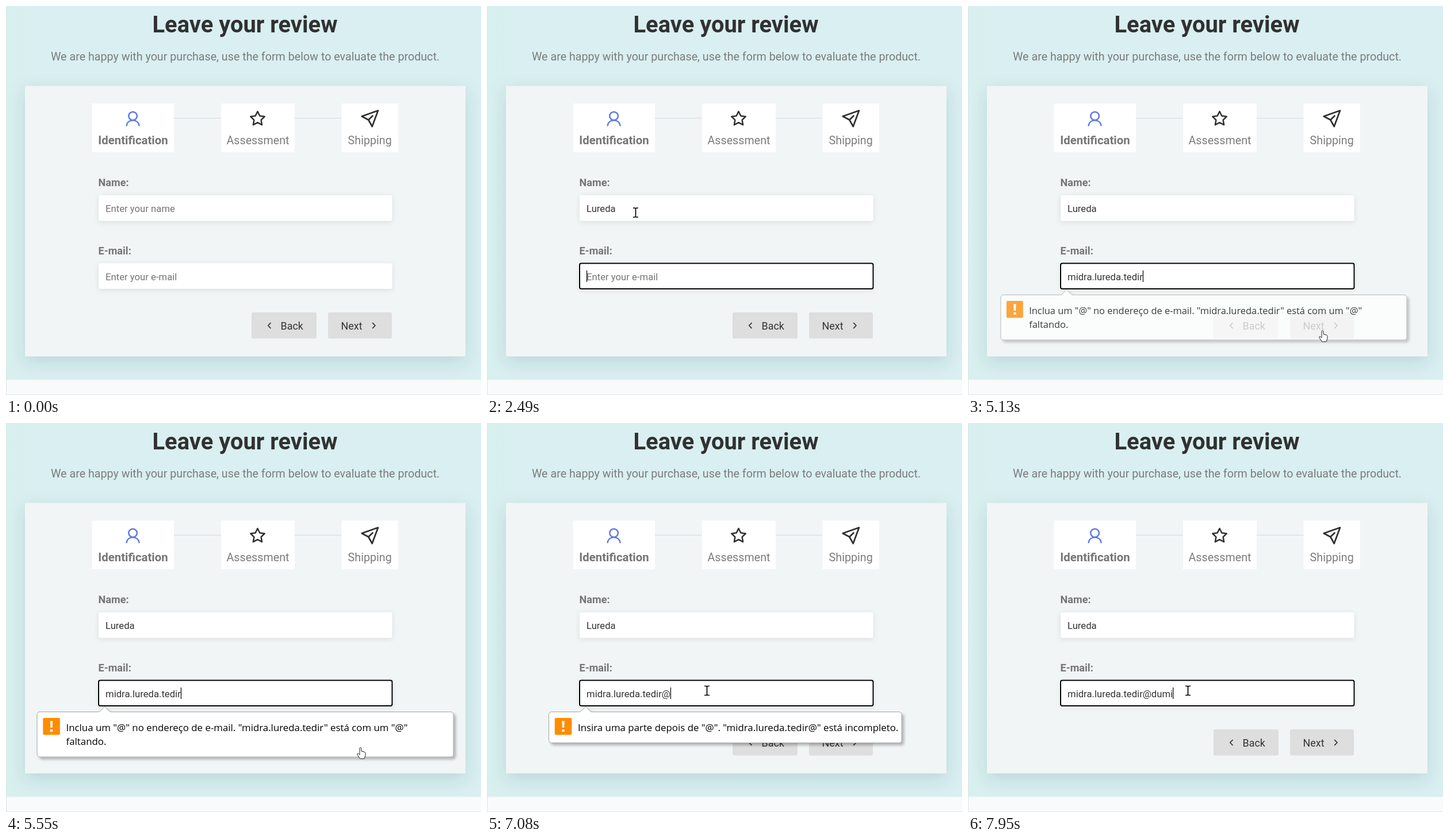
These frames come from a looping animation (826 px wide and 678 px high, 8 s). An HTML page:

```html
<!DOCTYPE html>
<html lang="en">
<head>
<meta charset="utf-8">
<title>Leave your review</title>
<style>
  html, body { margin: 0; width: 100%; height: 100%; overflow: hidden; }
  svg { display: block; width: 826px; height: 678px; }
  text { font-family: Roboto, "Noto Sans", sans-serif; fill: #757575; white-space: pre; }
  .title { font-size: 39.9px; font-weight: 700; fill: #313131; }
  .sub { font-size: 19.7px; fill: #7c7c7c; }
  .step { font-size: 19.7px; fill: #7c7c7c; }
  .active { font-size: 20.4px; font-weight: 700; }
  .label { font-size: 18.1px; font-weight: 700; }
  .field { font-size: 16.7px; }
  .typed { fill: #333; }
  .button { font-size: 17.9px; fill: #333; }
  .tip text { font: 16.85px "Open Sans", "Noto Sans", sans-serif; fill: #000; }
  .icon { fill: none; stroke: #2f2f2f; stroke-width: 2.5; stroke-linecap: round; stroke-linejoin: round; }
  .icon .user { stroke: #6079e4; }
  .icon .plane { stroke-width: 2.7; }
  .chevrons { stroke-width: 1.7; }
  .ring { fill: none; stroke: #000; stroke-width: 2; }
  .ring .rim { stroke: #fff; stroke-width: 4; }
  .mid { text-anchor: middle; }
</style>
</head>
<body>
<svg viewBox="0 0 826 678">
  <defs>
    <linearGradient id="sky">
      <stop offset="0" stop-color="#d8f0ee"/>
      <stop offset=".06" stop-color="#d9eff1"/>
    </linearGradient>
    <filter id="cardShadow" x="-10%" y="-15%" width="120%" height="130%">
      <feDropShadow dx="0" dy="10" stdDeviation="15" flood-color="#17444c" flood-opacity=".14"/>
    </filter>
    <filter id="fieldShadow" x="-5%" y="-40%" width="110%" height="200%">
      <feDropShadow dx="0" dy="2" stdDeviation="4" flood-opacity=".1"/>
    </filter>
    <filter id="tipShadow" x="-5%" y="-20%" width="110%" height="150%">
      <feDropShadow dx="4" dy="4" stdDeviation="2" flood-opacity=".25"/>
    </filter>
  </defs>

  <rect width="826" height="678" fill="url(#sky)"/>
  <rect x="33" y="139.5" width="766" height="471" fill="#f1f5f6" filter="url(#cardShadow)"/>
  <rect y="651.5" width="826" height="26.5" fill="#f9fafc"/>
  <path d="M.5 0V677.5H826" fill="none" stroke="#dde4e7"/>

  <text class="title mid" x="415.5" y="46">Leave your review</text>
  <text class="sub mid" x="416" y="94.5">We are happy with your purchase, use the form below to evaluate the product.</text>

  <path d="M150 195.5H682" stroke="#d3dcdd"/>
  <path d="M149.5 170H292V255H149.5zM374 170H502V255H374zM583.5 170H682V255H583.5z" fill="#fff"/>
  <g class="icon">
    <path class="user" d="M209.7 208.3C210.5 202.5 215 199.3 220.6 199.3S230.7 202.5 231.5 208.3M227.9 191.8a7.3 7.3 0 1 1-14.6 0a7.3 7.3 0 1 1 14.6 0z"/>
    <path id="star"/>
    <path class="plane" d="M647 182.3L618.7 192.3L630.3 198.5L636.7 210zM630.3 198.5L637.5 191.5"/>
  </g>
  <text class="active mid" x="221" y="241">Identification</text>
  <text class="step mid" x="438" y="241">Assessment</text>
  <text class="step mid" x="632.7" y="241">Shipping</text>

  <text class="label" x="160.5" y="314">Name:</text>
  <text class="label" x="160.5" y="433">E-mail:</text>
  <g fill="#fff" filter="url(#fieldShadow)">
    <rect x="161" y="330" width="510.5" height="44.5" rx="3"/>
    <rect x="161" y="448.5" width="510.5" height="44.5" rx="3"/>
  </g>
  <g id="ring" class="ring">
    <rect class="rim" x="161" width="510.5" height="44.5" rx="3"/>
    <rect x="161" width="510.5" height="44.5" rx="3"/>
  </g>
  <text id="name" class="field" x="173" y="359"/>
  <text id="email" class="field" x="173" y="477.7"/>
  <rect id="caret" width="1.2" height="20" fill="#000"/>

  <rect id="back" x="427" y="534" width="113" height="45.5" rx="3"/>
  <rect id="next" x="560" y="534" width="111" height="45.5" rx="3"/>
  <text class="button" x="477.5" y="564">Back</text>
  <text class="button" x="582.5" y="564">Next</text>
  <path class="icon chevrons" d="M460 552.7L455.7 557L460 561.3M637.7 552.7L642 557L637.7 561.3"/>

  <g id="tips"></g>
  <g id="cursors" stroke-linejoin="round">
    <path id="beam" fill="none" stroke="#000" stroke-width="1.7" d="M-4.5-8H-1.5L0-7L1.5-8H4.5M0-7V7M-4.5 8H-1.5L0 7L1.5 8H4.5"/>
    <path id="arrow" fill="#fff" stroke="#333" d="M0 .5V17L4 13.5L6.5 19L9 18L6.6 12.5H12z"/>
    <path id="hand" fill="#fff" stroke="#222" d="M-1.5 1Q0-1 1.5 1V6.5L6.5 7.7Q8.5 8.3 8.5 10.2V14L6.5 19.5H-1L-5.7 12.5Q-6 10-4 10.5L-1.5 12.7z"/>
  </g>
</svg>
<script>
const LOOP = 8000;
const $ = id => document.getElementById(id);
const clamp = v => Math.max(0, Math.min(1, v));
const show = (el, on) => el.setAttribute('visibility', on ? 'visible' : 'hidden');

const NAME = 'Lureda';
const LOCAL = 'midra.lureda.tedir';
const DOMAIN = '@dumi';
const nameKeys = [1630, 1830, 2030, 2170, 2220, 2360];
const pasteAt = 3420;
const domainKeys = [6580, 7410, 7550, 7720, 7950];
const focusName = 820, focusEmail = 2490;
const caretResets = [focusName, ...nameKeys, focusEmail, pasteAt, ...domainKeys];

// time, x, y
const pointer = [
  [130, 562, 589], [680, 258.5, 360], [3950, 258.5, 360], [4500, 549, 570],
  [4710, 616.5, 565.5], [5620, 616.5, 565.5], [6180, 382.5, 466.5]
];

const starPoints = Array.from({ length: 10 }, (_, i) => {
  const a = i * Math.PI / 5 - Math.PI / 2, r = i % 2 ? 6.5 : 12.9;
  return [437.5 + r * Math.cos(a), 196.7 + r * Math.sin(a)].map(v => v.toFixed(2));
});
$('star').setAttribute('d', 'M' + starPoints.join('L') + 'z');

function makeTip(left, right, bottom, lines, from, until, fade) {
  const g = document.createElementNS('http://www.w3.org/2000/svg', 'g');
  const ix = left + 10.3;
  g.setAttribute('class', 'tip');
  g.innerHTML = `
    <path filter="url(#tipShadow)" fill="#fff" stroke="#a3a3a3" d="M${left + 5} 503.5H162L171.5 494.5L181 503.5H${right - 5}
      q5 0 5 5V${bottom - 5}q0 5-5 5H${left + 5}q-5 0-5-5V508.5q0-5 5-5z"/>
    <rect x="${ix}" y="514" width="29.5" height="29.5" rx="2" fill="#ff8c00"/>
    <path fill="#fff" d="M${ix + 12.5} 519.5h4.5l-.6 11.5h-3.3zM${ix + 12.5} 534h4.5v4h-4.5z"/>
    ${lines.map((s, i) => `<text x="${left + 50.5}" y="${537 + 24 * i}">${s}</text>`).join('')}`;
  $('tips').append(g);
  return { g, from, until, fade };
}

const tips = [
  makeTip(54, 778, 582, [`Inclua um "@" no endereço de e-mail. "${LOCAL}" está com um "@"`, 'faltando.'], 4780, 6580, 0),
  makeTip(107.5, 721, 557.5, [`Insira uma parte depois de "@". "${LOCAL}@" está incompleto.`], 6590, 7410, 230)
];

const typedCount = (keys, t) => keys.filter(k => t >= k).length;

function setField(el, value, placeholder) {
  el.textContent = value || placeholder;
  el.classList.toggle('typed', !!value);
  return value ? el.getComputedTextLength() : 0;
}

function drawFields(t) {
  const name = NAME.slice(0, typedCount(nameKeys, t));
  const email = t < pasteAt ? '' : LOCAL + DOMAIN.slice(0, typedCount(domainKeys, t));
  const nameWidth = setField($('name'), name, 'Enter your name');
  const emailWidth = setField($('email'), email, 'Enter your e-mail');

  const onEmail = t >= focusEmail, focused = t >= focusName;
  show($('ring'), focused);
  $('ring').setAttribute('transform', `translate(0 ${onEmail ? 448.5 : 330})`);

  const reset = Math.max(0, ...caretResets.filter(k => k <= t));
  const steady = t >= 4480 && t < 6580;
  show($('caret'), focused && (steady || (t - reset) % 1060 < 530));
  $('caret').setAttribute('x', 173 + (onEmail ? emailWidth : nameWidth));
  $('caret').setAttribute('y', onEmail ? 461 : 342);
}

function drawTips(t) {
  for (const { g, from, until, fade } of tips) {
    const p = clamp((t - from) / 467);
    const out = t < until ? 1 : fade ? clamp(1 - (t - until) / fade) : 0;
    const scale = 0.9 + 0.1 * p;
    g.setAttribute('opacity', p * out);
    g.setAttribute('transform', `translate(${172 * (1 - scale)} 0) scale(${scale} 1)`);
    show(g, p * out > 0);
  }
}

function pointerAt(t) {
  const i = pointer.findIndex(k => k[0] > t);
  if (i < 0) return pointer[pointer.length - 1].slice(1);
  const [t0, x0, y0] = pointer[Math.max(0, i - 1)], [t1, x1, y1] = pointer[i];
  const u = clamp((t - t0) / (t1 - t0 || 1)), e = u * u * (3 - 2 * u);
  return [x0 + (x1 - x0) * e, y0 + (y1 - y0) * e];
}

function drawPointer(t) {
  const [x, y] = pointerAt(t);
  const inside = (l, r, top, bottom) => x > l && x < r && y > top && y < bottom;
  const onInput = inside(161, 671, 330, 374) || inside(161, 671, 448, 493);
  const onButton = inside(427, 540, 534, 580) || inside(560, 671, 534, 580);
  const kind = onInput ? 'beam' : onButton ? 'hand' : 'arrow';
  for (const id of ['beam', 'arrow', 'hand']) show($(id), t >= 130 && id === kind);
  $('cursors').setAttribute('transform', `translate(${x} ${y})`);
  $('back').setAttribute('fill', t > 4350 && t < 4570 ? '#dadada' : '#dedede');
  $('next').setAttribute('fill', t > 4600 && t < 5750 ? '#d0d0d0' : '#dedede');
}

function draw(t) {
  drawFields(t);
  drawTips(t);
  drawPointer(t);
}

const start = performance.now();
function tick(now) {
  draw(Math.max(0, now - start) % LOOP);
  requestAnimationFrame(tick);
}
draw(0);
requestAnimationFrame(tick);
</script>
</body>
</html>
```
